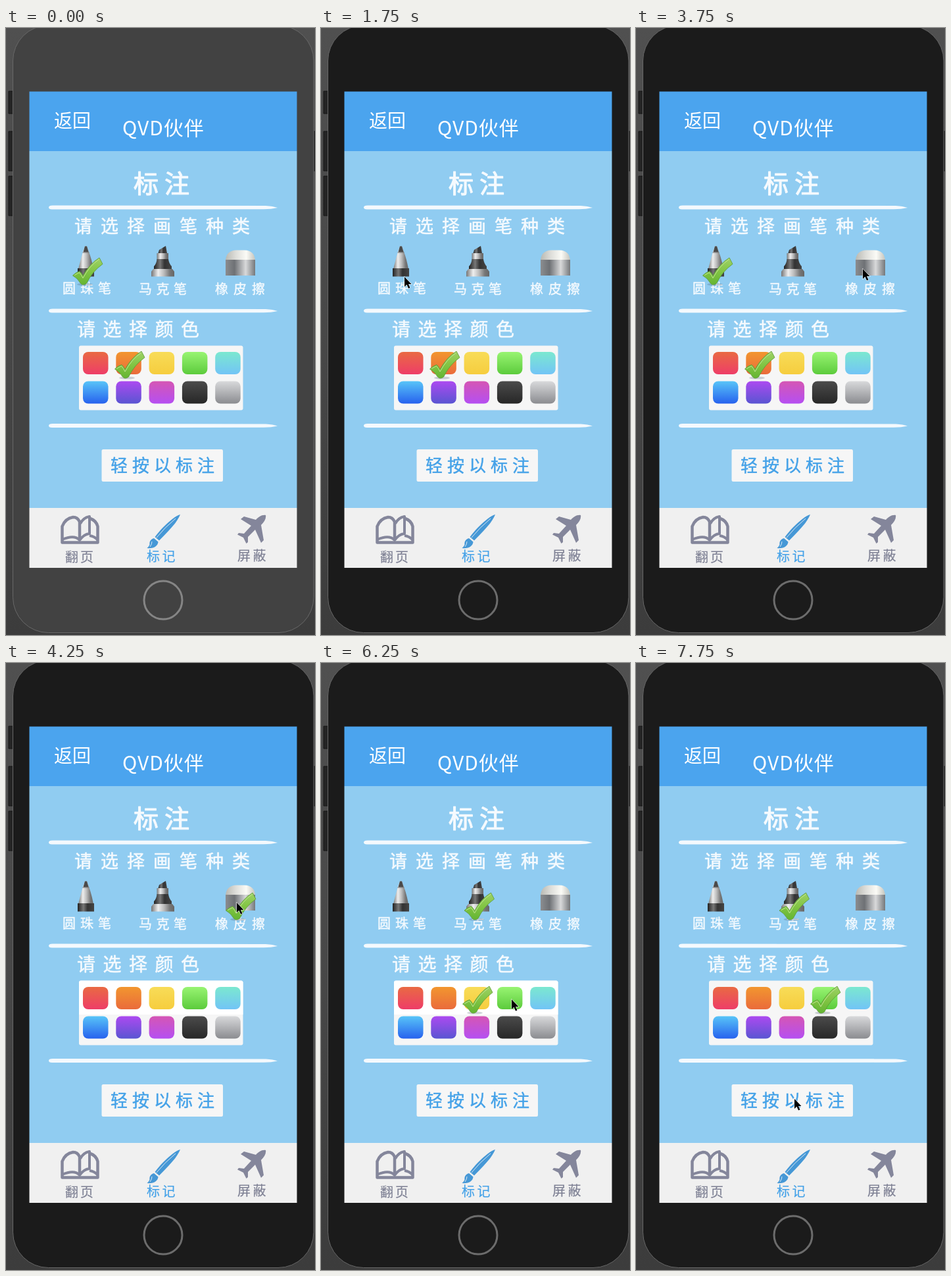
These frames come from a looping animation (470x922 px, 8000 ms). An HTML page:

```html
<!DOCTYPE html>
<html lang="zh">
<head>
<meta charset="utf-8">
<style>
html, body { margin: 0; width: 100%; height: 100%; overflow: hidden; background: #444; }
svg { display: block; width: 100%; height: 100%; }
text { font-family: "Noto Sans CJK SC", "Noto Sans CJK", "Noto Sans", sans-serif; stroke-linejoin: round; }
</style>
</head>
<body>
<svg viewBox="0 0 470 922">
  <defs>
    <linearGradient id="backdrop" x2="0" y2="1">
      <stop stop-color="#505050"/><stop offset=".5" stop-color="#484848"/><stop offset="1" stop-color="#3c3c3c"/>
    </linearGradient>
    <linearGradient id="metal">
      <stop stop-color="#777"/><stop offset=".3" stop-color="#eee"/><stop offset=".55" stop-color="#bbb"/>
      <stop offset=".8" stop-color="#777"/><stop offset="1" stop-color="#666"/>
    </linearGradient>
    <linearGradient id="dark">
      <stop stop-color="#222"/><stop offset=".35" stop-color="#777"/><stop offset=".6" stop-color="#333"/><stop offset="1" stop-color="#444"/>
    </linearGradient>
    <linearGradient id="steel">
      <stop stop-color="#8b8d90"/><stop offset=".3" stop-color="#6e7175"/><stop offset=".68" stop-color="#d8d9da"/><stop offset="1" stop-color="#75787b"/>
    </linearGradient>
    <linearGradient id="dome">
      <stop stop-color="#b9b9b2"/><stop offset=".35" stop-color="#dededa"/><stop offset=".7" stop-color="#fbfbf6"/><stop offset="1" stop-color="#c4c4bd"/>
    </linearGradient>
    <linearGradient id="leaf" x2="0" y2="1">
      <stop stop-color="#9ed267"/><stop offset=".5" stop-color="#82c544"/><stop offset="1" stop-color="#64b532"/>
    </linearGradient>
    <path id="rule" d="M65 0Q65-3 71-3L395-2.600Q406-2 413 .5Q403 3 390 2.800L70 3Q65 3 65 0Z" fill="#f4f9fd"/>
    <g id="check">
      <ellipse cx="19" cy="41.500" rx="12" ry="2" fill="#456" opacity=".25"/>
      <path d="M.5 28Q5 23 11 21.500Q14 24 16 28.500Q26 10 41 1L46 10.500Q30 22 21.500 40Q16 44 12.500 40Q8 32 .5 28Z" fill="url(#leaf)" stroke="#5a9a34" stroke-width=".8" stroke-linejoin="round"/>
      <path d="M3 27.500L10.500 23.500Q14 27 16 32Q26 13 41 3" fill="none" stroke="#bfe394"/>
    </g>
  </defs>

  <rect width="470" height="922" fill="url(#backdrop)"/>
  <path d="M4 96h8v34h-8zM4 157h8v60h-8zM4 225h8v60h-8zM466 157h4v60h-4z" fill="#252525" stroke="#151515"/>
  <rect id="phone" x="10.500" y="-4" width="457.500" height="922.500" rx="54" stroke="#686868"/>
  <circle id="home" cx="239" cy="869" r="29" fill="none" stroke-width="3"/>

  <path d="M35.500 96.500h407v90.500h-407z" fill="#4ba4ee"/>
  <path d="M35.500 187h407v542h-407z" fill="#90ccf1"/>
  <path d="M35.500 729h407v91h-407z" fill="#f0f0f0"/>
  <use href="#rule" y="272.500"/><use href="#rule" y="429.500"/><use href="#rule" y="604"/>

  <g id="pens">
    <path d="M110 366Q114 350 117 340L120 331.500H123L126 340Q130 350 133 366Z" fill="url(#metal)"/>
    <path d="M120 331.500h3l2.500 9h-8z" fill="#4a4a4a"/>
    <path d="M116.500 341h10" stroke="#777"/>
    <path d="M109 365h25v12.500h-25z" fill="url(#dark)"/>
    <path d="M231.500 342L233 337L243 331L245 342Z" fill="url(#dark)"/>
    <path d="M229.500 342h17.500v10h-17.500z" fill="url(#metal)"/>
    <path d="M229.500 351h17.500q1 7 5 11v4h-27v-4q4-4 4.500-11z" fill="url(#dark)"/>
    <path d="M224 366h29l3 4v7.500h-35v-7.500z" fill="url(#metal)"/>
    <path d="M334 353Q335 338 350 337.500H363Q378 338 379 353Z" fill="url(#dome)"/>
    <path d="M334 352h45v24h-45z" fill="url(#steel)"/>
  </g>

  <rect x="111" y="482.500" width="249.500" height="98" rx="3" fill="#f6f6f6"/>
  <path id="glare" d="M111 534V485.500Q111 482.500 114 482.500H357.500Q360.500 482.500 360.500 485.500V534Z" fill="#fff"/>
  <g id="swatches"></g>
  <rect x="145.500" y="640" width="184.500" height="49" rx="2.500" fill="#f6f6f6"/>

  <g fill="none" stroke="#84869b" stroke-width="4.500" stroke-linejoin="round">
    <path d="M112 778V750Q109 743 102 743Q90 745 85.500 757V781.500H139.500V757Q137 748 128 745"/>
    <path d="M85.500 777Q104 769 112 778Q118 769 127 768V742Q117 744 113 753M127 771Q134 772 139 777" stroke-width="4"/>
  </g>
  <g fill="#4698d6">
    <path d="M265 739C257 741 239 756 226.500 773L233 778.500C246 765 260 752 265 739Z"/>
    <path d="M225 775C219 777 218 781 218.500 785Q217 788 214.500 790C224 791.500 231 787 231.500 780.500Z"/>
    <path d="M229 774Q241 759 258 745M222 780Q222 784 219 788" fill="none" stroke="#d8e8f4"/>
  </g>
  <path d="M395 740C389 739 384 743 380 747L362 742L357 746L373 756L362 768L354 767L352 769.500L361 774L365.500 783L368 781L368 773L379 762L388 782L392 778L388 755C393 750 396 745 395 740Z" fill="#84869b"/>

  <g id="labels"></g>
  <use id="toolCheck" href="#check"/>
  <use id="colorCheck" href="#check"/>
  <path id="cursor" d="M0 0V15L3.500 11.800L6 17.500L8.500 16.400L6 11H10.500Z" fill="#000" stroke="#fff" stroke-width="1.100" paint-order="stroke"/>
</svg>
<script>
const el = id => document.getElementById(id);

function add(parent, tag, attrs, text = '') {
  const node = document.createElementNS('http://www.w3.org/2000/svg', tag);
  for (const name in attrs) node.setAttribute(name, attrs[name]);
  node.textContent = text;
  parent.append(node);
  return node;
}

// text, left, vertical centre, size, letter spacing, colour, outline width
const white = '#f5fafe', grey = '#7e8094', blue = '#45a2e8';
const labels = [
  ['返回', 73, 140, 28, 0, '#fff', 0],
  ['QVD伙伴', 177, 152, 30, 1, '#fff', 0],
  ['标注', 194, 236, 38, 9, white, 1.2],
  ['请选择画笔种类', 104, 301, 27, 13, white, 0.6],
  ['圆珠笔', 86, 395.5, 20, 7, white, 0.4],
  ['马克笔', 202, 396.5, 20, 6.5, white, 0.4],
  ['橡皮擦', 318, 396.5, 20, 8, white, 0.4],
  ['请选择颜色', 108, 457, 28, 11.5, white, 0.6],
  ['轻按以标注', 159, 664, 26, 7, blue, 0.5],
  ['翻页', 90, 803, 20, 3, grey, 0.2],
  ['标记', 214, 802, 20, 3.5, blue, 0.2],
  ['屏蔽', 352, 801, 20, 3.5, grey, 0.2]
];
for (const [text, x, y, size, spacing, color, outline] of labels) {
  add(el('labels'), 'text', {
    x, y: y + size * 0.375, fill: color, stroke: color, 'stroke-width': outline,
    'font-size': size, 'letter-spacing': spacing
  }, text);
}

const colors = [
  ['#e96a43', '#ee3d68'], ['#f2962f', '#ea6b3b'], ['#f8dc58', '#f6cd3e'], ['#98f472', '#5ccb3c'], ['#7be8d0', '#72c4f6'],
  ['#58c4f8', '#2762ee'], ['#ac4af0', '#5a55d2'], ['#d556b4', '#b54ff2'], ['#4b4b4b', '#272727'], ['#d8d9db', '#8b8c90']
];
colors.forEach(([top, bottom], i) => {
  const gradient = add(el('swatches'), 'linearGradient', { id: 'swatch' + i, x2: 0, y2: 1 });
  add(gradient, 'stop', { 'stop-color': top });
  add(gradient, 'stop', { offset: 1, 'stop-color': bottom });
  add(el('swatches'), 'rect', {
    x: 117 + i % 5 * 50.3, y: i < 5 ? 492 : 536.5,
    width: 38.5, height: 34, rx: 8, fill: `url(#swatch${i})`
  });
});

const NONE = -1, PEN = 0, MARKER = 1, ERASER = 2;
const ORANGE = 1, YELLOW = 2, GREEN = 3;

// start time, cursor x, cursor y, chosen tool, chosen colour; each holds until the next
const poses = [
  [0, -50, -50, PEN, ORANGE],
  [500, 167, 338, PEN, ORANGE],
  [750, 150, 358, PEN, ORANGE],
  [1000, 130, 380, PEN, ORANGE],
  [1250, 127, 378, PEN, ORANGE],
  [1750, 127, 378, NONE, ORANGE],
  [2000, 237, 370, MARKER, ORANGE],
  [2500, 205, 372, MARKER, ORANGE],
  [2750, 145, 373, MARKER, ORANGE],
  [3000, 129, 372, MARKER, ORANGE],
  [3250, 129, 372, PEN, ORANGE],
  [3500, 315, 368, PEN, ORANGE],
  [3750, 345, 366, PEN, ORANGE],
  [4000, 351, 364, ERASER, NONE],
  [4500, 346, 366, ERASER, NONE],
  [4750, 320, 370, ERASER, NONE],
  [5000, 250, 370, ERASER, NONE],
  [5250, 239, 368, MARKER, NONE],
  [5500, 238, 450, MARKER, NONE],
  [5750, 239, 511, MARKER, YELLOW],
  [6000, 275, 522, MARKER, YELLOW],
  [6250, 290, 511, MARKER, YELLOW],
  [6500, 290, 511, MARKER, GREEN],
  [6750, 281, 560, MARKER, GREEN],
  [7000, 254, 638, MARKER, GREEN],
  [7250, 241, 662, MARKER, GREEN]
];

function place(id, x, y, visible = true) {
  el(id).setAttribute('transform', `translate(${x} ${y})`);
  el(id).setAttribute('visibility', visible ? 'visible' : 'hidden');
}

function draw(now) {
  const t = now % 8000;
  const [, x, y, tool, color] = poses.findLast(pose => pose[0] <= t);
  place('cursor', x, y);
  place('toolCheck', 101 + tool * 116.5, 348, tool !== NONE);
  place('colorCheck', 115 + color * 50, 490, color !== NONE);
  el('phone').setAttribute('fill', t < 1750 ? '#424242' : '#1b1b1b');
  el('home').setAttribute('stroke', t < 1750 ? '#858585' : '#6c6c6c');
  el('glare').setAttribute('visibility', t >= 4000 && t < 7500 ? 'visible' : 'hidden');
}

const start = performance.now();
function tick() {
  draw(performance.now() - start);
  requestAnimationFrame(tick);
}
tick();
</script>
</body>
</html>
```
